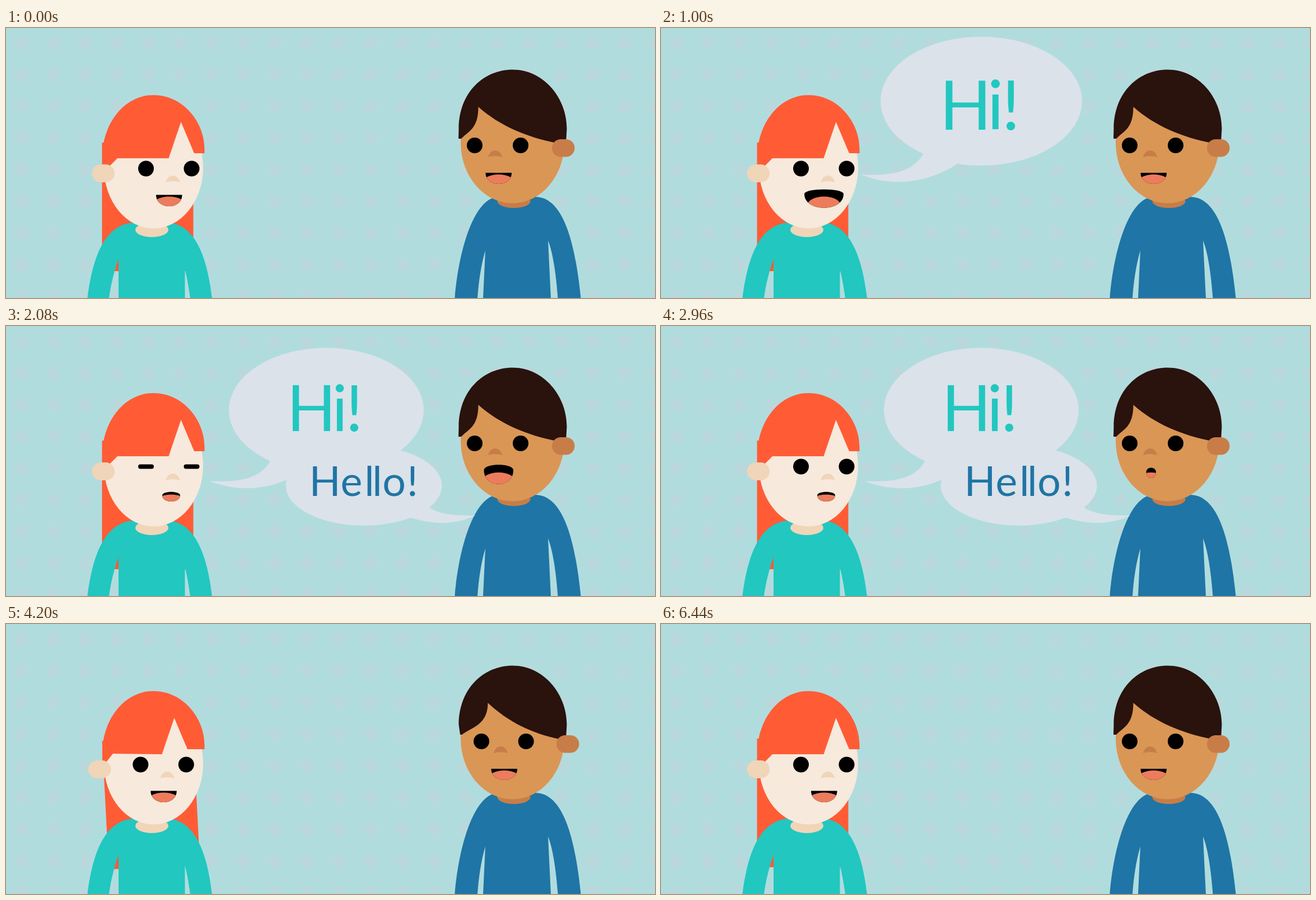
An HTML page for the animation above (6.88 s loop, 1159 by 483 pixels).

```html
<!DOCTYPE html>
<html lang="en">
<head>
<meta charset="utf-8">
<title>Two people greeting</title>
<style>
  html, body { margin: 0; width: 100%; height: 100%; overflow: hidden; }
  body {
    background: #b1dcde radial-gradient(circle at center, #bbd7db 0, #bbd7db 4px, #b1dcde 17px) -1px -1px / 56.7px 56.7px;
  }
  svg { display: block; width: 100%; height: 100%; }
  text { font-family: Lato, "Open Sans", sans-serif; text-anchor: middle; }
</style>
</head>
<body>
<svg viewBox="0 0 1159 483">
  <defs>
    <clipPath id="girlClip"><path id="girlClipPath"/></clipPath>
    <clipPath id="boyClip"><path id="boyClipPath"/></clipPath>
  </defs>

  <g id="girl">
    <rect id="backHair" x="171.5" y="205" width="163" height="230" fill="#ff5c36"/>
    <path fill="#22c7c0" d="M145.5 483C154 418 173 348 232 348H290C340 352 360 415 368 483H329C326 462 323 445 319.5 432V483H201V413C193 435 187 460 184 483Z"/>
    <ellipse cx="260.5" cy="361" rx="29.5" ry="13" fill="#f0d5b8"/>
    <ellipse cx="263.5" cy="250" rx="88.5" ry="108.5" fill="#f7e9dc"/>
    <path id="girlHair" fill="#ff5c36"/>
    <rect id="girlEar" x="153.5" y="244" width="40.5" height="32" rx="16" fill="#f0d5b8"/>
    <rect id="girlEye1" width="28"/>
    <rect id="girlEye2" width="28"/>
    <path id="girlNose" fill="#f0d5b8" d="M285.5 276C289 260 307 260 310.5 276Q298 272 285.5 276Z"/>
    <path id="girlMouth"/>
    <g clip-path="url(#girlClip)"><ellipse id="girlTongue" cy="317.5" rx="30" ry="16" fill="#ec7c5c"/></g>
  </g>

  <g id="boy">
    <path fill="#1f75a5" d="M801.5 483C808 400 835 305 878 302H945C1000 302 1018 400 1026.5 483H985.5C983 450 978 405 968 380L973 483H852L856 398C848 425 844 455 842 483Z"/>
    <ellipse cx="907" cy="310" rx="29.5" ry="12" fill="#c87d48"/>
    <ellipse cx="904.5" cy="205" rx="92.5" ry="108.5" fill="#da9655"/>
    <path id="boyHair" fill="#2a120d"/>
    <rect id="boyEar" x="975" y="199" width="40.5" height="31.5" rx="15.7" fill="#c87d48"/>
    <circle id="boyEye1" cx="837" cy="210" r="14"/>
    <circle id="boyEye2" cx="919" cy="210" r="14"/>
    <path id="boyNose" fill="#c87d48" d="M861 231C864.5 215 882.5 215 886 231Q873.5 227 861 231Z"/>
    <path id="boyMouth"/>
    <g clip-path="url(#boyClip)"><ellipse id="boyTongue" cy="278" rx="30" ry="16" fill="#ec7c5c"/></g>
  </g>

  <g id="hi">
    <g id="hiBubble" fill="#dbe2ea">
      <ellipse cx="572" cy="150.5" rx="174" ry="111.5"/>
      <path d="M472 241C455 272 420 280 364 277.5C420 300 480 292 531 259L540 200Z"/>
    </g>
    <text id="hiText" x="545.5 596 622" y="188" font-size="115" fill="#22c7c0">Hi!</text>
  </g>
  <g id="hello">
    <g id="helloBubble" fill="#dbe2ea">
      <ellipse cx="639" cy="285.5" rx="139.5" ry="71.5"/>
      <path d="M753 323C775 338 800 339 838 339C800 357 760 355 720 342L700 300Z"/>
    </g>
    <text id="helloText" x="569.5 617 649 663 693 726" y="304" font-size="73.5" fill="#1f75a5">Hello!</text>
  </g>
</svg>
<script>
const LOOP = 6880, STEP = 40;
const $ = id => document.getElementById(id);
const set = (id, attrs) => { for (const k in attrs) $(id).setAttribute(k, attrs[k]); };

// Progress from 0 to 1 between two times
const ramp = (t, a, b) => Math.min(1, Math.max(0, (t - a) / (b - a)));
const smooth = p => p * p * (3 - 2 * p);
const backOut = p => 1 + 2.7 * (p - 1) ** 3 + 1.7 * (p - 1) ** 2;
const mix = (a, b, k) => a.map((v, i) => v + (b[i] - v) * k);
const shift = (id, dx) => set(id, { transform: `translate(${dx} 0)` });
const scaleAt = (id, s, x, y) =>
  set(id, { transform: `translate(${x} ${y}) scale(${s}) translate(${-x} ${-y})` });

// Mouth poses: left, right, corner y, upper control y, lower control y
const mouths = {
  girl: { smile: [268, 314.5, 298.5, 298.5, 325.8], open: [256, 326, 297, 286, 330], small: [279, 311, 303, 294.7, 317.7] },
  boy: { smile: [856.5, 903, 259, 259, 285.5], open: [853.5, 906, 258, 245, 291], small: [866.5, 884, 262, 250.7, 275.3] }
};

function drawMouth(who, t, start, dx) {
  const { smile, open, small } = mouths[who];
  let m = mix(smile, open, smooth(ramp(t, start, start + 180)));
  m = mix(m, small, smooth(ramp(t, start + 590, start + 770)));
  m = mix(m, smile, smooth(ramp(t, 3400, 3560)));
  const [l, r, y, up, low] = m;
  const d = `M${l + dx} ${y}C${l + dx} ${up} ${r + dx} ${up} ${r + dx} ${y}C${r + dx} ${low} ${l + dx} ${low} ${l + dx} ${y}Z`;
  set(who + "Mouth", { d });
  set(who + "ClipPath", { d });
  set(who + "Tongue", { cx: (l + r) / 2 + dx });
}

function drawGirl(t) {
  const k = smooth(ramp(t, 3480, 3560)) - smooth(ramp(t, 5680, 5760));
  const sway = 1.55 * (1 - Math.cos(4 * Math.PI * ramp(t, 3600, 5760)));
  set("backHair", { transform: `rotate(${-sway} 253 205)` });
  set("girlHair", {
    d: `M172 262V232C172 170 212 120 263.5 120C316 120 354.5 168 354.5 216V224H${336 - 12 * k}` +
       `L${312.5 - 12 * k} 168L${290.5 - 12 * k} 233L${199 - 8 * k} ${233 - k}L${185 - 6 * k} 247Z`
  });
  shift("girlEar", -6.7 * k);
  shift("girlNose", -10 * k);
  const closed = smooth(ramp(t, 1980, 2060)) - smooth(ramp(t, 2200, 2280));
  const h = 28 - 20 * closed;
  [236, 317.5].forEach((x, i) =>
    set("girlEye" + (i + 1), { x: x - 9.7 * k, y: 251.5 - h / 2, height: h, rx: h / 2 }));
  drawMouth("girl", t, 720, -9.7 * k);
}

function drawBoy(t) {
  const k = smooth(ramp(t, 3480, 3560)) - ramp(t, 6360, 6440);
  set("boyHair", {
    d: `M${808 + 3 * k} 198L808.5 180C809 115 853 74.5 905 74.5C960 74.5 1001.5 125 1001.5 180L1000 206H${984 + 4 * k}` +
       `C${930 + 8 * k} 195 ${883 + 15 * k} 176 ${843.5 + 17 * k} 141C${843.5 + 17 * k} 181 ${825 + 6 * k} 185 ${813 + k} 198Z`
  });
  shift("boyEar", 8 * k);
  shift("boyEye1", 12 * k);
  shift("boyEye2", 9.7 * k);
  shift("boyNose", 10 * k);
  drawMouth("boy", t, 1540, 10 * k);
}

// A bubble springs up from below the stage, then its text pops in
function drawBubble(id, t, start, x, bottom, outX, outY) {
  scaleAt(id + "Bubble", backOut(ramp(t, start, start + 410)), x, 723);
  scaleAt(id + "Text", backOut(ramp(t, start + 163, start + 573)), x, bottom);
  scaleAt(id, 1 - ramp(t, 2960, 3367) ** 2, outX, outY);
}

function draw(now) {
  const t = Math.floor((now % LOOP) / STEP) * STEP;
  drawGirl(t);
  drawBoy(t);
  drawBubble("hi", t, 658, 572, 300, 560, 343);
  drawBubble("hello", t, 1478, 638, 357, 634, 351);
}

let begin;
function tick(now) {
  begin ??= now;
  draw(now - begin);
  requestAnimationFrame(tick);
}
draw(0);
requestAnimationFrame(tick);
</script>
</body>
</html>
```
